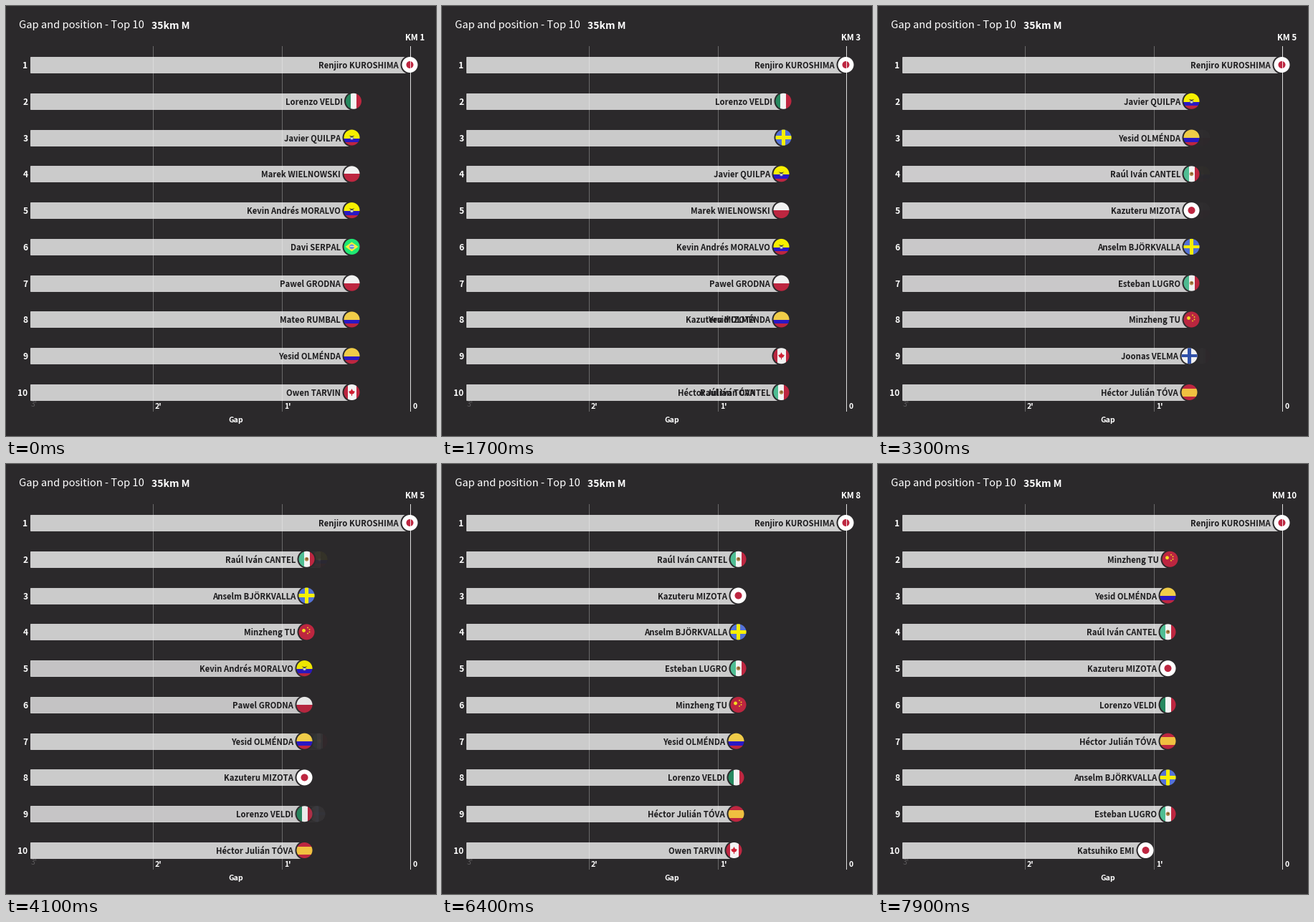
A matplotlib script that plays this animation: 600x600 px, repeating every 8000 ms.

```python
import matplotlib.pyplot as plt
from matplotlib.animation import FuncAnimation
from matplotlib.patches import Circle, Polygon, Rectangle
from matplotlib.path import Path
from matplotlib.transforms import Affine2D

FONT = "Noto Sans CJK JP"
BG = "#2b292b"
PX = 0.72          # points per pixel at 100 dpi
LEFT, BAR_H = 33.5, 22
FLAG_R = 11
FLAG_GAP = 15.5    # from label end to flag centre
RED = "#bd2640"

RACERS = {
    "d": ("Renjiro KUROSHIMA", "japan"),
    "m": ("Lorenzo VELDI", "italy"),
    "a": ("Javier QUILPA", "ecuador"),
    "r": ("Marek WIELNOWSKI", "poland"),
    "b": ("Kevin Andrés MORALVO", "ecuador"),
    "c": ("Davi SERPAL", "brazil"),
    "w": ("Pawel GRODNA", "poland"),
    "g": ("Mateo RUMBAL", "colombia"),
    "e": ("Yesid OLMÉNDA", "colombia"),
    "v": ("Owen TARVIN", "canada"),
    "p": ("Anselm BJÖRKVALLA", "sweden"),
    "k": ("Kazuteru MIZOTA", "japan"),
    "j": ("Raúl Iván CANTEL", "mexico"),
    "l": ("Héctor Julián TÓVA", "spain"),
    "o": ("Joonas VELMA", "finland"),
    "x": ("Minzheng TU", "china"),
    "z": ("Esteban LUGRO", "mexico"),
    "t": ("Katsuhiko EMI", "japan"),
}

# Move start and end in ms, km, then groups of (label end, racers in rank order)
STAGES = [
    (-500, 0, 1, (469.5, "m"), (467, "arbcwgev")),
    (50, 860, 2, (465, "m"), (462.5, "arbcwevj")),
    (870, 1690, 3, (461, "mp"), (458, "arbwevj")),
    (1695, 2250, 4, (437, "arbwejkml")),
    (2495, 3310, 5, (422, "aejkpzx"), (419, "ol")),
    (3320, 4130, 5, (404, "jpx"), (401, "bwekml")),
    (4250, 4750, 6, (395, "jkpx"), (392, "emlz"), (389, "b")),
    (4930, 5820, 7, (388, "px"), (385.5, "evjkmlz")),
    (5950, 6400, 8, (398, "jkpzx"), (395, "eml"), (392, "v")),
    (6430, 7150, 9, (395, "kx"), (392, "ejmlpz"), (387, "v")),
    (7160, 7900, 10, (392, "x"), (389, "ejkmlpz"), (358, "t")),
]


def slot_y(rank):
    return 82 + 50.78 * rank


def layout(groups):
    """Map each racer to (label end, y)."""
    order = [(548, "d")] + [(end, k) for end, keys in groups for k in keys]
    return {k: (end, slot_y(i)) for i, (end, k) in enumerate(order)}


LAYOUTS = [layout(stage[3:]) for stage in STAGES]

fig = plt.figure(figsize=(6, 6), dpi=100, facecolor=BG)
ax = fig.add_axes([0, 0, 1, 1])
ax.set_xlim(0, 600)
ax.set_ylim(600, 0)
ax.axis("off")


def put(x, y, text, size, ha="left", weight="normal", color="white", z=6):
    return ax.text(x, y, text, fontsize=size * PX, ha=ha, va="center_baseline",
                   weight=weight, color=color, family=FONT, zorder=z)


def box(x0, y0, x1, y1, color):
    return Rectangle((x0, y0), x1 - x0, y1 - y0, fc=color, lw=0)


def dot(x, y, r, color):
    return Circle((x, y), r, fc=color, lw=0)


def columns(left, mid, right, edge=4):
    return [box(-12, -12, -edge, 12, left), box(-edge, -12, edge, 12, mid),
            box(edge, -12, 12, 12, right)]


def rows(top, mid, low, y0, y1):
    return [box(-12, -12, 12, y0, top), box(-12, y0, 12, y1, mid),
            box(-12, y1, 12, 12, low)]


def cross(field, bar, w):
    return [box(-12, -12, 12, 12, field), box(-w, -12, w, 12, bar),
            box(-12, -w, 12, w, bar)]


def poly(color, *pts):
    return Polygon(pts, closed=True, fc=color, lw=0)


def flag_parts(kind):
    if kind == "japan":
        return [box(-12, -12, 12, 12, "white"), dot(0, 0, 5, RED)]
    if kind == "italy":
        return columns("#26885f", "#f4f4f4", RED)
    if kind == "mexico":
        return columns("#4fbd93", "#f4f4f4", RED) + [
            dot(0, 0, 2.8, "#b08a4a"), dot(0.3, -0.5, 1.2, "#7a4a2a")]
    if kind == "ecuador":
        return rows("#f8f000", "#2a18c4", RED, 1, 6.5) + [
            dot(0, 0.5, 2.6, "#8f9a8a"), dot(0, 1, 1.4, "#d8d8e8"),
            poly("#33302a", (-4, -3), (0, -1.8), (4, -3), (0, 0))]
    if kind == "poland":
        return rows("#f2f2f2", "#f2f2f2", RED, -5, 0)
    if kind == "brazil":
        return [box(-12, -12, 12, 12, "#1fe873"),
                poly("#f5ee3c", (-9, 0), (0, -6.5), (9, 0), (0, 6.5)),
                dot(0, 0, 3.4, "#6f90d8"), box(-3, -0.6, 3, 0.6, "#e8f0f0")]
    if kind == "colombia":
        return rows("#f0cc48", "#2a18c4", RED, 0.5, 6)
    if kind == "canada":
        return columns(RED, "#f4f4f4", RED, 6) + [
            poly("#d01f33", (0, -5), (1.6, -2), (4.4, -1.2), (2.6, 2),
                 (0.5, 2.6), (0.5, 5), (-0.5, 5), (-0.5, 2.6),
                 (-2.6, 2), (-4.4, -1.2), (-1.6, -2))]
    if kind == "sweden":
        return cross("#5472d8", "#f8f000", 2.2)
    if kind == "finland":
        return cross("#f4f4f4", "#2f4fa8", 2.2)
    if kind == "spain":
        return rows(RED, "#f0c040", RED, -5.5, 5.5)
    stars = [(1.5, -6), (4, -3.5), (4, 0), (1.5, 2)]
    return [box(-12, -12, 12, 12, RED), dot(-4, -2, 2.4, "#f5e020")] + [
        dot(x, y, 0.9, "#f5e020") for x, y in stars]


class Racer:
    def __init__(self, name, kind):
        self.bar = Rectangle((LEFT, 0), 1, BAR_H, lw=PX, zorder=2)
        ax.add_patch(self.bar)
        self.label = put(0, 0, name, 11.3, "right", "bold", "#1d1c1e")
        self.shift = Affine2D()
        place = self.shift + ax.transData
        clip = Affine2D().scale(FLAG_R) + place
        ring = dot(0, 0, FLAG_R + 2, BG)
        self.flag = [ring] + flag_parts(kind)
        for part in self.flag:
            part.set_zorder(4)
            ax.add_patch(part)
            part.set_transform(place)
            if part is not ring:
                part.set_clip_path(Path.unit_circle(), clip)
        self.parts = [self.bar, self.label] + self.flag

    def hide(self):
        for part in self.parts:
            part.set_visible(False)

    def show(self, end, y, alpha=1, edge=0.6, labelled=True):
        for part in self.parts:
            part.set_visible(True)
        x = end + FLAG_GAP
        self.bar.set_xy((LEFT, y - BAR_H / 2))
        self.bar.set_width(x - LEFT)
        self.bar.set_facecolor((1, 1, 1, 0.76 * alpha))
        self.bar.set_edgecolor((1, 1, 1, edge))
        self.shift.clear().translate(x, y)
        for part in self.flag:
            part.set_alpha(alpha)
        self.label.set_position((end, y))
        self.label.set_visible(labelled)


put(18, 26, "Gap and position - Top 10", 14.8)
put(203, 26, "35km M", 14, weight="bold")
km_label = put(584, 43, "", 11.6, "right", "bold")
put(321, 577, "Gap", 10.5, "center", "bold")
for i in range(10):
    put(30.5, slot_y(i), str(i + 1), 12, "right", "bold")
put(35, 555, "3'", 10.5, color="#5c5a5c", z=1)
for x, text in [(208, "2'"), (388, "1'"), (567, "0")]:
    put(x, 558.5, text, 10.5, weight="bold")
for x, alpha in [(204.5, 0.3), (384.5, 0.3), (563.5, 0.85)]:
    ax.plot([x, x], [56, 565], color="white", alpha=alpha, lw=PX, zorder=5)

racers = {key: Racer(*info) for key, info in RACERS.items()}


def ease(t):
    return 4 * t**3 if t < 0.5 else 1 - 4 * (1 - t)**3


def update(frame):
    now = frame * 100
    n = max(i for i, stage in enumerate(STAGES) if stage[0] <= now)
    start, stop = STAGES[n][:2]
    t = min(1, (now - start) / (stop - start))
    old, new = LAYOUTS[max(n - 1, 0)], LAYOUTS[n]
    p, fade = ease(t), t**1.25
    # The km changes just after the new names appear
    km_label.set_text(f"KM {STAGES[n if now - start > 20 else n - 1][2]}")
    for key, racer in racers.items():
        if key in old and key in new:
            end, y = (a + (b - a) * p for a, b in zip(old[key], new[key]))
            racer.show(end, y)
        elif key in new:
            edge = min(1, 5 * fade) * (1 - 0.4 * t)
            racer.show(*new[key], fade, edge)
        elif key in old and t < 1:
            racer.show(*old[key], 1 - fade, 0.6 * (1 - fade), False)
        else:
            racer.hide()
    return []


anim = FuncAnimation(fig, update, frames=80, interval=100, repeat=True,
                     repeat_delay=0, blit=False)
plt.show()
```
